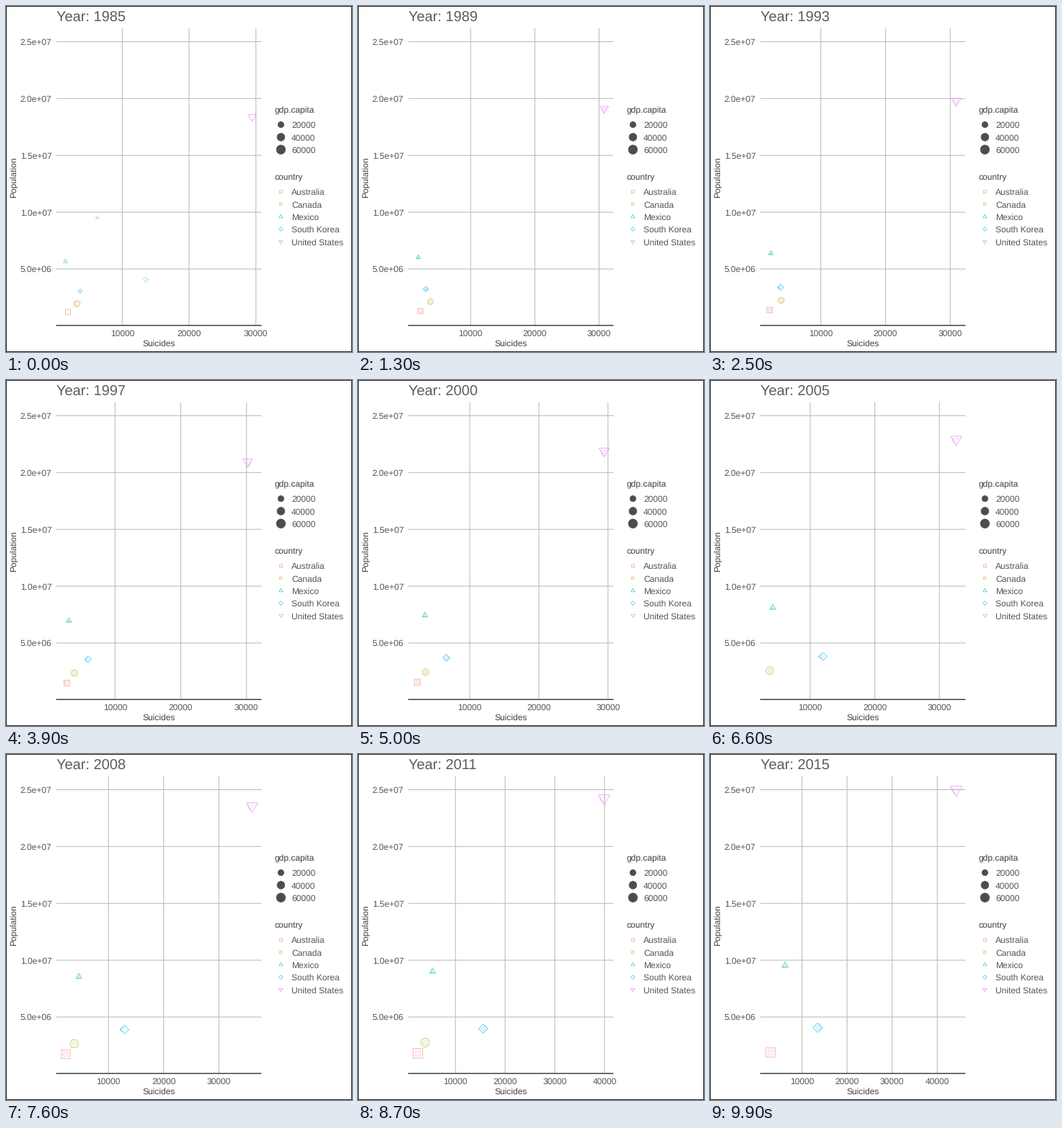
Recreate the animation shown at these times as a matplotlib script. Size 480 by 480 pixels, loop 10 s.

```python
import matplotlib.pyplot as plt
import numpy as np
from matplotlib.animation import FuncAnimation
from matplotlib.collections import LineCollection, PolyCollection
from matplotlib.colors import to_rgba
from matplotlib.patches import Circle, Rectangle

plt.rcParams["font.family"] = "Liberation Sans"
plt.rcParams["text.hinting"] = "no_hinting"

FRAMES, YEARS, WAKE = 100, 30, 5
LEFT, RIGHT, TOP, BOTTOM = 69.5, 354.5, 31, 443.2
PAD = (RIGHT - LEFT) / 22
ALPHA, STROKE = 0.7, 0.75
TITLE, DARK, TEXT, GRID = "#5c5c5c", "#404040", "#555555", "#bebebe"
GDP_MIN, GDP_MAX = 1.93, 72.7

years = np.linspace(0, YEARS, FRAMES)

# Marker outlines for a unit radius, y pointing down
angle = np.linspace(0, 2 * np.pi, 48, endpoint=False)
CIRCLE = np.column_stack([np.cos(angle), np.sin(angle)])
SQUARE = np.array([(-1, -1), (1, -1), (1, 1), (-1, 1)])
DIAMOND = np.sqrt(2) * np.array([(0, -1), (1, 0), (0, 1), (-1, 0)])
UP = np.array([(0, -1.551), (1.343, 0.776), (-1.343, 0.776)])
DOWN = UP * (1, -1)


def path(*points):
    """Value in every frame, linear between (year, value) points."""
    return np.interp(years, *zip(*points))


def y_pos(pop):
    return 443.75 - 15.77 * pop


def point_size(gdp):
    share = (gdp - GDP_MIN) / (GDP_MAX - GDP_MIN)
    return 1 + 5 * np.sqrt(np.clip(share, 0, 1))


def radius(size):
    return 0.375 * (2.845 * size + 0.945)


class Country:
    def __init__(self, name, color, shape, deaths, pop, gdp, gone=(YEARS, YEARS)):
        self.name, self.color, self.shape = name, color, shape
        self.x, self.y, self.size = deaths * 1000, y_pos(pop), point_size(gdp)
        self.shown = (years <= gone[0]) | (years >= gone[1])

    def outline(self, i, to_px, shrink):
        return self.shape * radius(self.size[i] * shrink) + (to_px(self.x[i]), self.y[i])


# Deaths and GDP per head in thousands, population in millions
countries = [
    Country("Australia", "#F8766D", SQUARE,
            path((0, 1.86), (2, 2.2), (8, 2.1), (12, 2.7), (19, 2.1), (26, 2.4), (30, 3.03)),
            path((0, 1.22), (30, 1.88)),
            path((0, 12.4), (16, 21), (27, 73), (30, 61)), gone=(19.2, 20.8)),
    Country("Canada", "#A3A500", CIRCLE,
            path((0, 3.26), (1, 3.64), (10, 3.95), (15, 3.6), (28, 3.95)),
            path((0, 1.98), (8, 2.26), (30, 2.84)),
            path((0, 15.3), (17, 26), (23, 49), (28, 56)), gone=(28, 31)),
    Country("Mexico", "#00BF7D", UP,
            path((0, 1.49), (6, 2.05), (15, 3.5), (23, 4.64), (30, 6.26)),
            path((0, 5.66), (8, 6.42), (30, 9.53)),
            path((0, 2.9), (30, 10.8))),
    Country("South Korea", "#00B0F6", DIAMOND,
            path((0, 3.69), (4, 3), (7, 3.5), (12, 6), (13, 8.6), (15, 6.45),
                 (20, 12), (21, 10.7), (23, 12.85), (24, 15.4), (26, 15.8), (30, 13.5)),
            path((0, 3.06), (15, 3.71), (30, 4.06)),
            path((0, 2.7), (15, 12.5), (30, 29))),
    Country("United States", "#E76BF3", DOWN,
            path((0, 29.45), (1, 30.7), (10, 31), (14, 29.2), (15, 29.35),
                 (20, 32.6), (23, 36), (30, 44.2)),
            path((0, 18.38), (7.6, 19.76), (15, 21.86), (30, 25.01)),
            path((0, 19.7), (30, 60.4))),
]

fig = plt.figure(figsize=(480 / 72, 480 / 72), dpi=72, facecolor="white")
ax = fig.add_axes([0, 0, 1, 1])
ax.set(xlim=(0, 480), ylim=(480, 0))
ax.axis("off")


def label(x, y, s, color=TEXT, size=12, **kw):
    return ax.text(x, y, s, color=color, fontsize=size, va="baseline", **kw)


def rule(y, **kw):
    ax.plot([LEFT, RIGHT], [y, y], solid_capstyle="butt", snap=False, **kw)


def markers(zorder=3):
    group = PolyCollection([], facecolors="none", linewidths=STROKE, zorder=zorder)
    group.set_snap(False)
    ax.add_collection(group)
    return group


# Fixed parts
ax.add_patch(Rectangle((0.5, 0.5), 479, 479, fill=False, ec="#222222", lw=1,
                       snap=False))
for v in range(5, 26, 5):
    rule(y_pos(v), color=GRID, lw=1.1, zorder=1)
    label(63.5, y_pos(v) + 4.4, f"{v * 1e6:.1e}", ha="right")
rule(BOTTOM, color="#333333", lw=1.4, zorder=4)
label(212, 472, "Suicides", DARK, ha="center")
label(14.8, 237.3, "Population", DARK, rotation=90, rotation_mode="anchor",
      ha="center")

label(372.7, 149, "gdp.capita", DARK)
for k, gdp in enumerate((20, 40, 60)):
    y = 164.6 + 17.3 * k
    ax.add_patch(Circle((381.4, y), radius(point_size(gdp)), color="#4d4d4d",
                        lw=STROKE))
    label(396, y + 4.6, str(gdp * 1000))

label(372.7, 242, "country", DARK)
rows = [257.7 + 17.3 * k for k in range(len(countries))]
legend = markers()
legend.set_verts([c.shape * radius(1.5) + (381.4, y) for c, y in zip(countries, rows)])
legend.set_edgecolor([to_rgba(c.color, ALPHA) for c in countries])
for c, y in zip(countries, rows):
    label(396, y + 4.5, c.name)

# Moving parts
title = label(69.5, 21.3, "", TITLE, 20)
grid = LineCollection([], colors=GRID, linewidths=1.1, zorder=1)
grid.set_snap(False)
ax.add_collection(grid)
marks = markers()
marks.set_clip_path(Rectangle((LEFT, TOP), RIGHT - LEFT, BOTTOM - TOP,
                              transform=ax.transData))
x_labels = [label(0, 458.3, "", ha="center") for _ in range(5)]


def view(i):
    """Horizontal range of the points and their recent trail."""
    recent = range(max(0, i - WAKE), i + 1)
    xs = [c.x[j] for c in countries if c.shown[i] for j in recent if c.shown[j]]
    return min(xs), max(xs)


def update(i):
    lo, hi = view(i)
    scale = (RIGHT - LEFT - 2 * PAD) / (hi - lo)

    def to_px(v):
        return LEFT + PAD + (v - lo) * scale

    title.set_text(f"Year: {round(1985 + years[i])}")

    breaks = [b for b in range(0, 60000, 10000) if LEFT <= to_px(b) <= RIGHT]
    grid.set_segments([[(to_px(b), TOP), (to_px(b), BOTTOM)] for b in breaks])
    for k, t in enumerate(x_labels):
        t.set_visible(k < len(breaks))
        if k < len(breaks):
            t.set_text(str(breaks[k]))
            t.set_x(to_px(breaks[k]))

    verts, colors = [], []
    for back in reversed(range(WAKE)):
        j = (i - back) % FRAMES
        fade = (1 - back / WAKE) ** 3
        for c in countries:
            if c.shown[i] and c.shown[j]:
                verts.append(c.outline(j, to_px, fade))
                colors.append(to_rgba(c.color, ALPHA * fade))
    marks.set_verts(verts)
    marks.set_edgecolor(colors)
    return [title, grid, marks, *x_labels]


anim = FuncAnimation(fig, update, frames=FRAMES, interval=100, repeat=True,
                     repeat_delay=0, blit=False)
plt.show()
```
